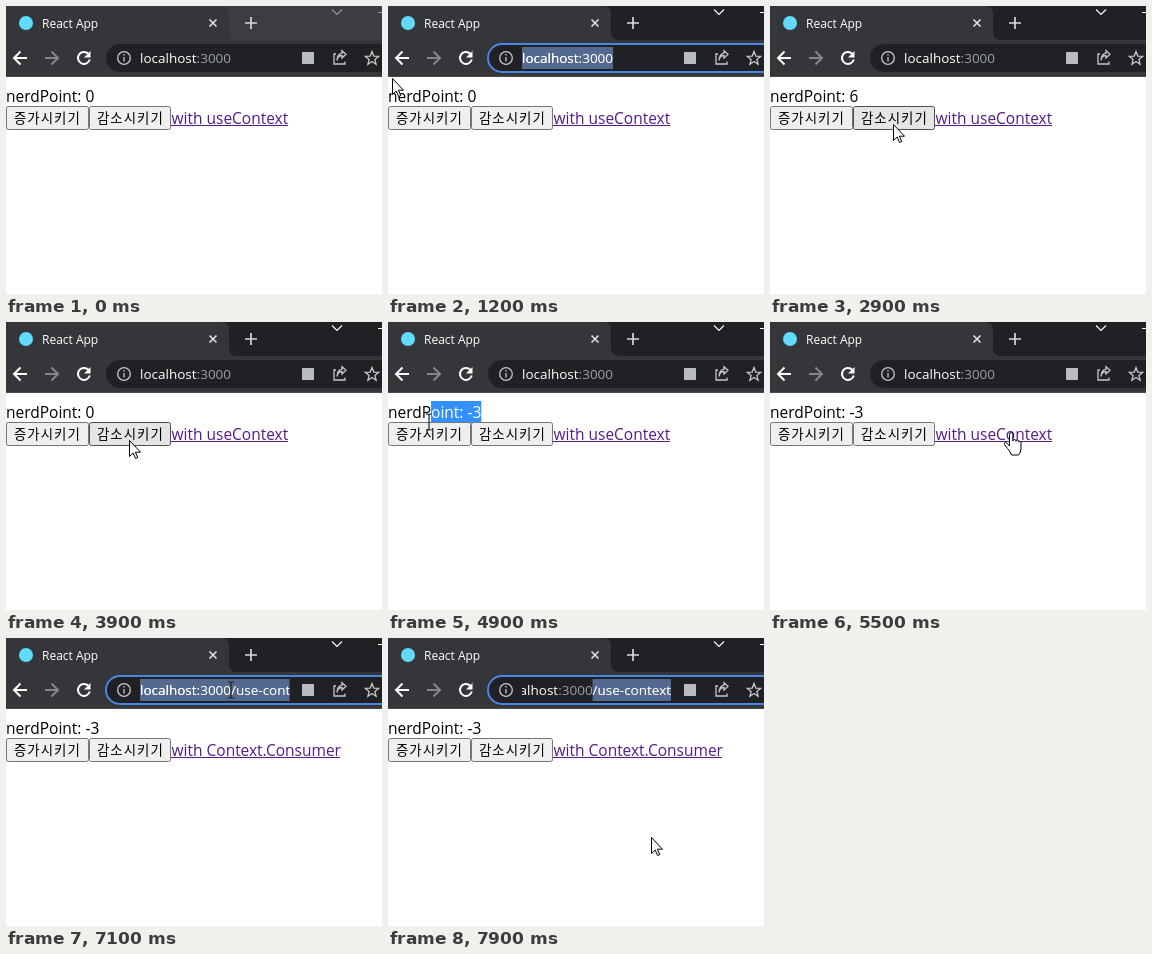
These frames come from a looping animation (376x288 px, 8 s). An HTML page:

```html
<!DOCTYPE html>
<html lang="ko">
<head>
<meta charset="utf-8">
<title>React App</title>
<style>
  html, body { margin: 0; width: 100%; height: 100%; overflow: hidden; background: #fff; }
  svg { display: block; width: 100%; height: 100%; }
  text { font-family: "Open Sans", "Noto Sans", sans-serif; white-space: pre; }
  .page { font-size: 15.5px; }
  .url { font-size: 13.5px; }
  .btn text { font: 300 13.4px "Noto Sans CJK KR", "Noto Sans CJK", sans-serif; letter-spacing: 1.05px; }
  .btn rect { fill: #efefef; stroke: #767676; }
  .btn.hover rect { fill: #e5e5e5; stroke: #4f4f4f; }
  .btn.active rect { fill: #f5f5f5; stroke: #8d8d8d; }
  .icon { fill: none; stroke: #c4c7ca; stroke-width: 1.3; }
  .nav { fill: none; stroke: #fff; stroke-width: 2; }
</style>
</head>
<body>
<svg viewBox="0 0 376 288">
  <defs>
    <clipPath id="urlBox"><rect x="134" y="38" width="149.5" height="28"/></clipPath>
    <clipPath id="urlCut"><rect id="urlCutBox" y="41" height="22"/></clipPath>
    <clipPath id="textCut"><rect id="textCutBox" y="79" height="22"/></clipPath>
  </defs>

  <rect width="376" height="288" fill="#fff"/>
  <rect id="strip" width="376" height="35"/>
  <path d="M0 0H215Q223 0 223 8V26Q223 34 231 34H376V70H0Z" fill="#35363a"/>
  <rect y="70" width="376" height="1" fill="#4a4b4f"/>
  <circle cx="20" cy="17" r="7" fill="#61dafb"/>
  <text x="36" y="21.5" font-size="12" fill="#fff">React App</text>
  <path d="M203.500 13.500l7 7m0-7l-7 7" fill="none" stroke="#dfe1e5" stroke-width="1.6"/>
  <path d="M239 17h12m-6-6v12" fill="none" stroke="#d5d7da" stroke-width="1.7"/>
  <path id="chevron" d="M326 3.500l5 5 5-5M372 6.500h4" fill="none" stroke-width="1.1"/>

  <path class="nav" d="M21 52H8.500M14.500 45.500L8 52l6.500 6.500"/>
  <path class="nav" style="stroke:#85868a" d="M39 52h12.500M45.500 45.500L52 52l-6.500 6.500"/>
  <path class="nav" d="M82.300 47.700A6 6 0 1 0 83.800 53.500"/>
  <path d="M84.500 45v6.500H78Z" fill="#fff"/>

  <rect id="pill" x="100" y="38" width="320" height="28" rx="14" fill="#202124" stroke-width="2"/>
  <circle class="icon" cx="118" cy="52" r="6.300"/>
  <path class="icon" d="M118 51v4.500M118 48v1.600"/>
  <g clip-path="url(#urlBox)">
    <g id="urlScroll">
      <rect id="urlSel" y="41" height="22" fill="#54698f"/>
      <text id="url" class="url" x="134" y="57" fill="#9aa0a6"><tspan fill="#fff">localhost</tspan><tspan id="urlRest"></tspan></text>
      <text id="urlLit" class="url" x="134" y="57" fill="#fff" clip-path="url(#urlCut)"></text>
    </g>
  </g>
  <rect x="296" y="46" width="12" height="12" rx="1" fill="#b9bcc0"/>
  <path class="icon" d="M330 48h-2v10h11v-2.500M331 54.500q.7-5 5-5v2.500l4-3.700-4-3.600v2.500q-4.500.5-5 7.300Z"/>
  <path class="icon" id="star"/>

  <text id="point" class="page" x="0" y="96"></text>
  <rect id="textSel" y="79" height="22" fill="#3390ff"/>
  <text id="pointLit" class="page" x="0" y="96" fill="#fff" clip-path="url(#textCut)"></text>
  <g id="inc" class="btn"><rect x=".5" y="100.500" width="82" height="23" rx="2"/><text x="8" y="117">증가시키기</text></g>
  <g id="dec" class="btn"><rect x="83.500" y="100.500" width="81" height="23" rx="2"/><text x="91" y="117">감소시키기</text></g>
  <g id="link">
    <text id="linkText" class="page" x="165.500" y="118"></text>
    <rect id="underline" x="165" y="119" height="1"/>
  </g>

  <g id="cursor">
    <path id="arrow" d="M.5 .5V16.500l3.700-3.500 2.400 5.500 2.200-1-2.400-5.300h5.100Z" fill="#fff" stroke="#000"/>
    <path id="beam" d="M-3-8h2l1 1 1-1h2M0-7V7M-3 8h2l1-1 1 1h2" fill="none" stroke="#222" stroke-width="1.2"/>
    <path id="hand" d="M-1.500 13V1.500q0-2 1.700-2t1.700 2V8q0-1.500 1.600-1.500T5 8.300q0-1.300 1.500-1.300T8 9q.3-1 1.300-.7T10 10v6q0 3-2.500 6h-7q-1-3-4-6.500l-3-4q-.6-2 1.200-2 1.300 0 3.800 3.500Z" fill="#fff" stroke="#000"/>
  </g>
</svg>
<script>
const LOOP = 8000, STEP = 100;
const $ = id => document.getElementById(id);
const set = (id, attrs) => { for (const k in attrs) $(id).setAttribute(k, attrs[k]); };
const show = (id, on) => set(id, { visibility: on ? 'visible' : 'hidden' });
const clamp = (v, lo, hi) => Math.min(hi, Math.max(lo, v));

// Pointer stops: time, x, y
const PATH = [
  [400, 364, 234], [600, 210, 150], [700, 190, 52], [800, 190, 52],
  [1000, 50, 74], [1200, 4, 72], [1400, 90, 209], [1500, 90, 209],
  [1700, 48, 112], [2600, 48, 112], [2800, 123, 118], [4400, 123, 118],
  [4700, 112, 92], [4900, 41, 100], [5000, 41, 100], [5200, 150, 195],
  [5300, 150, 195], [5500, 241, 111], [6400, 241, 111], [6600, 232, 82],
  [6800, 225, 52], [7300, 225, 52], [7600, 300, 53], [7900, 263, 199]
];

function pointer(t) {
  const i = PATH.findIndex(p => p[0] >= t);
  if (i < 0) return PATH[PATH.length - 1].slice(1);
  if (i === 0) return PATH[0].slice(1);
  const [t0, x0, y0] = PATH[i - 1], [t1, x1, y1] = PATH[i];
  const p = (t - t0) / (t1 - t0), e = p * p * (3 - 2 * p);
  return [x0 + (x1 - x0) * e, y0 + (y1 - y0) * e];
}

const clicks = (t, start, max) => clamp(Math.floor((t - start) / 150), 0, max);
const pressed = (t, start, max) => {
  const phase = (t - start) % 150;
  return t > start && t < start + max * 150 && phase > 40 && phase < 90;
};

function select(rect, cut, from, to) {
  const box = { x: from, width: Math.max(0, to - from) };
  set(rect, box);
  set(cut, box);
}

function drawUrl(t, onContext) {
  const all = (t >= 800 && t < 1500) || (t >= 6900 && t < 7300);
  const focus = all || t >= 7300;
  const rest = ':3000' + (onContext ? (focus ? '/use-context' : '/use-co...') : '');
  $('urlRest').textContent = rest;
  $('urlLit').textContent = 'localhost' + rest;
  set('pill', { stroke: focus ? '#4a86e0' : 'none' });

  const end = 134 + $('url').getComputedTextLength();
  let from = 134, to = 134, scroll = 0;
  if (all) to = end;
  else if (focus) {
    const n = Math.round(12 * clamp((t - 7300) / 300, 0, 1));
    from = $('urlLit').getStartPositionOfChar(14).x;
    to = n ? $('urlLit').getEndPositionOfChar(13 + n).x : from;
    if (n > 7) scroll = 283 - end;
  }
  select('urlSel', 'urlCutBox', from, to);
  set('urlScroll', { transform: `translate(${scroll} 0)` });
}

function drawPoint(t, x) {
  const text = 'nerdPoint: ' + (clicks(t, 1700, 6) - clicks(t, 2900, 9));
  $('point').textContent = $('pointLit').textContent = text;
  let from = 0, to = 0;
  if (t > 4700 && t < 5300) {
    const edge = t < 4900 ? x : 41;
    const start = i => $('point').getStartPositionOfChar(i).x;
    to = from = $('point').getComputedTextLength();
    for (let i = text.length - 1; i >= 0; i--) {
      const mid = (start(i) + $('point').getEndPositionOfChar(i).x) / 2;
      if (mid > edge) from = start(i);
    }
  }
  select('textSel', 'textCutBox', from, to);
}

function drawLink(t, onContext) {
  $('linkText').textContent = onContext ? 'with Context.Consumer' : 'with useContext';
  set('underline', { width: Math.round($('linkText').getComputedTextLength()) });
  set('link', { fill: t === 5600 ? '#ff0000' : '#551a8b' });
}

function render(t) {
  const [x, y] = pointer(t);
  const awake = t >= 500, onContext = t >= 5700;
  set('strip', { fill: awake ? '#202124' : '#3c3d41' });
  set('chevron', { stroke: awake ? '#fff' : '#96989c' });
  drawUrl(t, onContext);
  drawPoint(t, x);
  drawLink(t, onContext);

  const dragging = t >= 4700 && t <= 5000;
  const onRow = t >= 400 && !dragging && y > 101 && y < 124;
  const state = (over, down) => 'btn' + (over ? ' hover' : '') + (down ? ' active' : '');
  set('inc', { class: state(onRow && x < 83, pressed(t, 1700, 6)) });
  set('dec', { class: state(onRow && x > 83 && x < 165, pressed(t, 2900, 9)) });

  const hand = onRow && x > 165 && x < (onContext ? 335 : 282);
  const beam = dragging || (y > 80 && y < 101 && x < 94) || (y > 39 && y < 65 && x > 130 && x < 310);
  show('arrow', t >= 400 && !hand && !beam);
  show('beam', t >= 400 && beam);
  show('hand', hand);
  set('cursor', { transform: `translate(${Math.round(x)} ${Math.round(y)})` });
}

const star = Array.from({ length: 10 }, (_, i) => {
  const a = i * Math.PI / 5, r = i % 2 ? 3 : 7;
  return (366 + r * Math.sin(a)).toFixed(1) + ' ' + (52.5 - r * Math.cos(a)).toFixed(1);
});
set('star', { d: 'M' + star.join('L') + 'Z' });

const begin = performance.now();
function tick() {
  const t = (performance.now() - begin) % LOOP;
  render(Math.floor(t / STEP) * STEP);
  requestAnimationFrame(tick);
}
tick();
</script>
</body>
</html>
```
